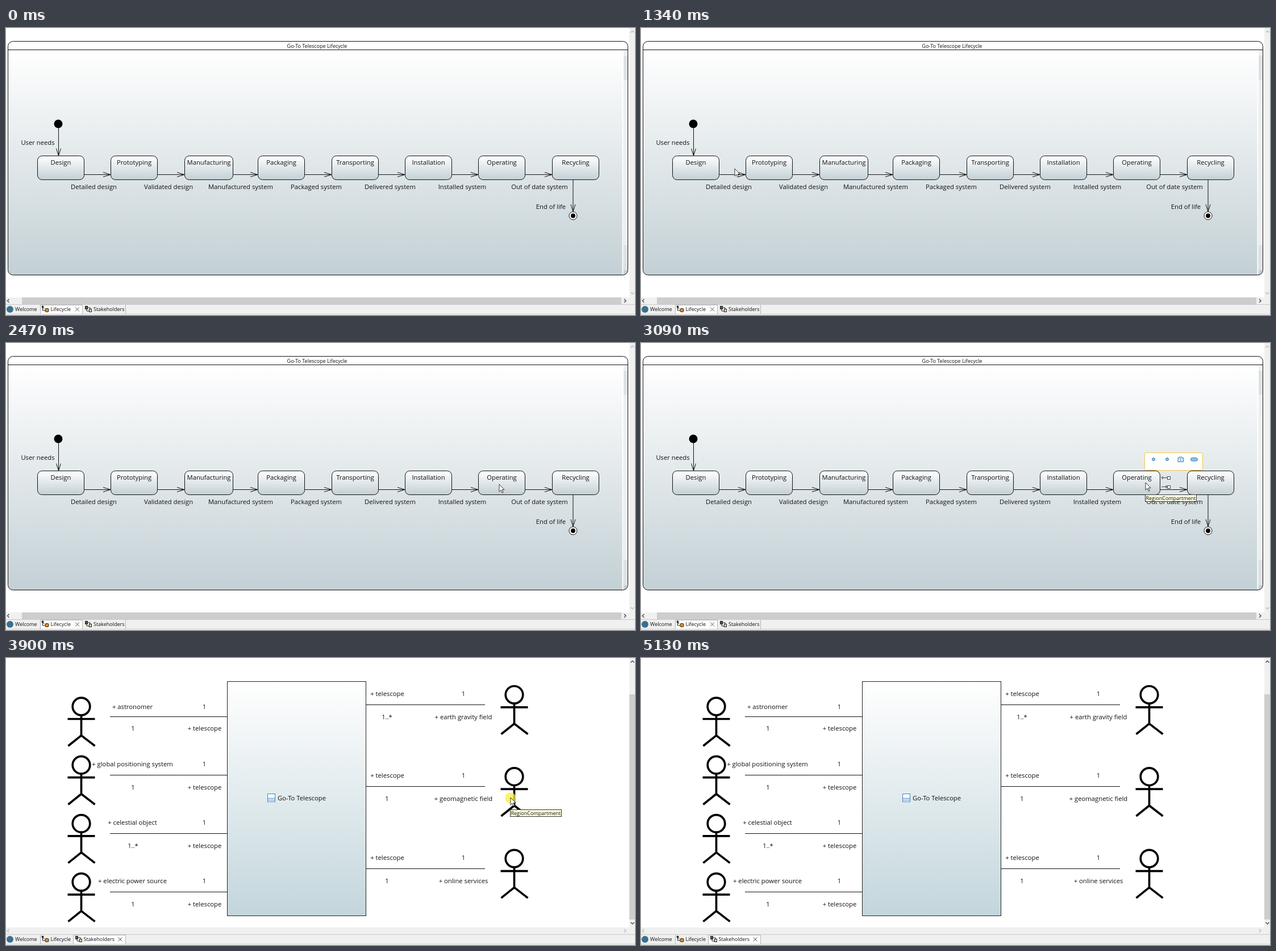
Animation, 1107 px wide and 506 px high, one loop 8 s. Source, as an HTML page:

```html
<!DOCTYPE html>
<html lang="en">
<head>
<meta charset="utf-8">
<title>Telescope model</title>
<style>
  html, body { margin: 0; width: 100%; height: 100%; overflow: hidden; background: #fff; }
  svg { display: block; width: 100%; height: 100%; }
  text { font: 11.25px "Open Sans", "Noto Sans", sans-serif; fill: #111; }
  .mid { text-anchor: middle; }
  .small { font-size: 9px; }
  .line { fill: none; stroke: #111; }
  .actor { fill: none; stroke: #000; stroke-width: 3.7; }
  .icon { stroke: #222; }
</style>
</head>
<body>
<svg id="stage" viewBox="0 0 1107 506">
  <defs>
    <linearGradient id="shade" x2="0" y2="1">
      <stop stop-color="#fff"/><stop offset="1" stop-color="#c3d0d5"/>
    </linearGradient>
    <linearGradient id="block" x2="0" y2="1">
      <stop stop-color="#fff"/><stop offset="1" stop-color="#c3d6dc"/>
    </linearGradient>
    <g id="chart-icon" class="icon">
      <path d="M2 1V8H6M2 4H5" fill="none"/>
      <circle cx="2" cy="1.5" r="1.5" fill="#222"/>
      <rect x="6.5" y="4.500" width="6" height="6" rx="1.500" fill="#e08a1e"/>
    </g>
    <g id="class-icon" class="icon">
      <path d="M5 3H9V6M3 6V9H7" fill="none"/>
      <rect x=".5" y=".5" width="4" height="5" fill="#555"/>
      <rect x="7.500" y="5.500" width="4" height="5" fill="#e8d9a0"/>
    </g>
    <path id="close" d="M-3.500-3.500 3.500 3.500M3.500-3.500-3.500 3.500" stroke="#555" fill="none"/>
  </defs>

  <g id="lifecycle" data-on="0 3900">
    <path d="M3.500 38.500H1094.500V426a10 10 0 0 1-10 9.500H13.500a10 10 0 0 1-10-9.500Z" fill="url(#shade)"/>
    <path d="M1085.500 40V434" stroke="#fff" stroke-width="2"/>
    <rect x="1087" y="40" width="7" height="387" fill="#eeefef"/>
    <path d="M1090.500 49V91M1090.500 383V427" stroke="#dfe1e2" stroke-width="7"/>
    <rect class="line" x="3.500" y="23.500" width="1091" height="412" rx="9"/>
    <path class="line" d="M3.500 38.500H1094.500"/>
    <text class="mid small" x="547.5" y="35">Go-To Telescope Lifecycle</text>
    <circle cx="92" cy="169" r="7.500"/>
    <path class="line" d="M92.500 176V225M88.500 212.500 92.500 225 96.500 212.500"/>
    <text class="mid" x="56" y="205.500">User needs</text>
    <path class="line" d="M998 268V323.500M994 311 998 323.500 1002 311"/>
    <circle cx="998" cy="331" r="7" fill="#fff" stroke="#111"/>
    <circle cx="998" cy="331" r="4"/>
    <text class="mid" x="959" y="319">End of life</text>
  </g>

  <g id="stakeholders" data-on="3900 8000">
    <rect x="389.500" y="41.500" width="244" height="413" fill="url(#block)" stroke="#222"/>
    <rect x="460.500" y="239.500" width="13" height="14" fill="#f4f9fd" stroke="#4a83bf"/>
    <path d="M461 247.500H473M461 250.500H473" stroke="#4a83bf"/>
    <text class="mid" x="520.5" y="251">Go-To Telescope</text>
  </g>

  <g id="chrome">
    <rect x="1097" width="10" height="475" fill="#f0f0f0"/>
    <rect y="475" width="1107" height="12" fill="#f0f0f0"/>
    <rect y="487" width="1107" height="18" fill="#f0f0f0"/>
    <path d="M0 487.500H1107M0 504.500H1107" stroke="#c9c9c9"/>
    <circle cx="7" cy="496" r="6" fill="#38718f"/>
    <text class="small" x="16" y="499">Welcome</text>
    <g data-on="0 3830">
      <rect id="thumb" x="28" y="475" width="1055" height="12" fill="#cdcdcd"/>
      <path d="M60.500 504V488.500H134.500V504" fill="#fff" stroke="#b4b4b4"/>
      <path d="M210.500 488V504" stroke="#b4b4b4"/>
      <use href="#close" x="125.500" y="496"/>
      <use href="#class-icon" x="139" y="490"/>
      <text class="small" x="154" y="499">Stakeholders</text>
    </g>
    <g data-on="3830 8000">
      <rect x="1097" y="64" width="10" height="397" fill="#cdcdcd"/>
      <path d="M60.500 488V504" stroke="#b4b4b4"/>
      <path d="M118.500 504V488.500H210.500V504" fill="#fff" stroke="#b4b4b4"/>
      <use href="#close" x="201" y="496"/>
      <use href="#class-icon" x="122" y="490"/>
      <text class="small" x="136.500" y="499">Stakeholders</text>
    </g>
    <use href="#chart-icon" x="62.500" y="490"/>
    <text class="small" x="78.500" y="499">Lifecycle</text>
    <g fill="none" stroke-width="1.500">
      <path id="sideways" d="M5.500 478 2.500 481 5.500 484M1088 478 1091 481 1088 484"/>
      <path id="upright" d="M1099.500 8 1102.500 5 1105.500 8M1099.500 466 1102.500 469 1105.500 466"/>
    </g>
  </g>

  <g data-on="3020 3690">
    <rect x="886.500" y="193.500" width="102" height="31" rx="3" fill="#fff" stroke="#f3c545"/>
    <g fill="#8fc1e8" stroke="#3c78ae">
      <circle cx="902" cy="205" r="2.500"/><circle cx="926" cy="205" r="2.500"/>
      <path d="M945 202.500H947V201H952V202.500H954.500V209.500H945Z" fill="#d6e8f6"/>
      <path d="M949.500 203V209" stroke-dasharray="2 1"/>
      <rect x="967.500" y="202.500" width="12" height="5.500" rx="2.500"/>
    </g>
    <g fill="#fff" stroke="#444">
      <path d="M926 237.500H916M919 235 916 237.500 919 240M916 253.500H926M923 251 926 253.500 923 256" fill="none"/>
      <rect x="926.500" y="235.500" width="5" height="5"/><rect x="926.500" y="251.500" width="5" height="5"/>
    </g>
  </g>
  <g id="selection" data-on="3760 3900">
    <rect x="832" y="225.500" width="82.500" height="42.500" fill="none" stroke="#000" stroke-width="1.800"/>
  </g>
  <circle data-on="3690 3970" cx="888" cy="247" r="9.800" fill="#fbee3c" opacity=".75"/>
  <g data-on="3090 4300">
    <rect x="887.500" y="267.500" width="90" height="12" fill="#ffffe1" stroke="#333"/>
    <text class="small" x="888.500" y="277">RegionCompartment</text>
  </g>
  <g id="cursor" data-on="400 5130">
    <path d="M0 0V13.200L3 10.400 5.100 15.200 7.100 14.300 5 9.600H9Z" fill="#fff" stroke="#222" stroke-width=".9"/>
    <g id="plus">
      <rect x="9.500" y="15.500" width="8" height="8" rx="1" fill="#fff" stroke="#111"/>
      <path d="M13.500 17.500V21.500M11.500 19.500H15.500" stroke="#111"/>
    </g>
  </g>
</svg>
<script>
const LOOP = 8000, STEP = 1000 / 15, PITCH = 129.4;
const $ = id => document.getElementById(id);
const label = (x, y, s) => `<text class="mid" x="${x}" y="${y}">${s}</text>`;
const line = (d, kind = 'line') => `<path class="${kind}" d="${d}"/>`;
const add = (id, markup) => $(id).insertAdjacentHTML('beforeend', markup);

// Lifecycle: state name, outgoing label and the label's centre
const states = [
  ['Design', 'Detailed design', 154.5], ['Prototyping', 'Validated design', 286],
  ['Manufacturing', 'Manufactured system', 413], ['Packaging', 'Packaged system', 546],
  ['Transporting', 'Delivered system', 676], ['Installation', 'Installed system', 803],
  ['Operating', 'Out of date system', 939], ['Recycling']
];
states.forEach(([name, next, centre], i) => {
  const x = Math.round(55 + PITCH * i) + 0.5;
  const w = name === 'Manufacturing' ? 85 : 82;
  const tip = Math.round(55 + PITCH * (i + 1));
  add('lifecycle',
    `<rect x="${x}" y="225.5" width="${w}" height="42" rx="8" fill="url(#shade)" stroke="#111"/>` +
    label(x + w / 2, 241, name));
  if (next) add('lifecycle',
    line(`M${x + w} 258.500H${tip}M${tip - 13} 254.500 ${tip} 258.500 ${tip - 13} 262.500`) +
    label(centre, 284, next));
});

// Stakeholders
const actor = (x, y) =>
  `<circle class="actor" cx="${x}" cy="${y}" r="15.3"/>` +
  line(`M${x} ${y + 15}V${y + 51}M${x - 24} ${y + 22}H${x + 24}` +
       `M${x - 23} ${y + 69.5}L${x} ${y + 51} ${x + 24} ${y + 69.5}`, 'actor');

[['astronomer', 1], ['global positioning system', 1], ['celestial object', '1..*'], ['electric power source', 1]]
  .forEach(([role, count], i) => {
    const y = 103.5 + 103 * i, first = i === 0;
    add('stakeholders', actor(132.5, 85.5 + 103.2 * i) + line(`M183 ${y}H389`) +
      label(222.5, y - (first ? 14 : 16), '+ ' + role) + label(349, y - (first ? 14 : 16), 1) +
      label(223.5, y + (first ? 24.5 : 25), count) + label(349.5, y + (first ? 24.5 : 25), '+ telescope'));
  });
[['earth gravity field', '1..*'], ['geomagnetic field', 1], ['online services', 1]]
  .forEach(([role, count], i) => {
    const y = 82.5 + Math.round(144.4 * i);
    add('stakeholders', actor(894.5, 64.8 + 144.4 * i) + line(`M634 ${y}H843`) +
      label(671, y - 15.5, '+ telescope') + label(805, y - 15.5, 1) +
      label(670.5, y + 25.5, count) + label(805, y + 25.5, '+ ' + role));
  });

// Selection handles around the state
for (let i = 0; i < 9; i++) {
  if (i === 4) continue;
  add('selection', `<rect x="${830 + i % 3 * 41}" y="${223.5 + (i / 3 | 0) * 21.2}" width="4" height="4"/>`);
}

// Pointer path: time, x, y
const path = [
  [400, 318, 499], [467, 290, 464], [600, 231, 382], [733, 180, 320], [867, 141, 281],
  [1000, 115, 257], [1133, 105, 247], [1200, 105, 247], [1333, 165, 248], [1467, 305, 251],
  [1600, 445, 254], [1733, 560, 256], [1933, 690, 258], [2067, 742, 258], [2200, 795, 258],
  [2333, 836, 254], [2467, 868, 249], [2600, 888, 246], [4267, 888, 246], [4400, 901, 267],
  [4533, 926, 309], [4667, 957, 360], [4800, 991, 417], [4933, 1021, 466], [5060, 1044, 504]
];
function pointerAt(t) {
  const i = path.findIndex(p => p[0] > t);
  if (i < 1) return path[i < 0 ? path.length - 1 : 0].slice(1);
  const [a, b] = [path[i - 1], path[i]];
  const k = (t - a[0]) / (b[0] - a[0]);
  return [1, 2].map(n => Math.round(a[n] + (b[n] - a[n]) * k));
}

const timed = [...document.querySelectorAll('[data-on]')]
  .map(node => [node, ...node.dataset.on.split(' ').map(Number)]);
const start = performance.now();

function draw() {
  const t = Math.max(0, performance.now() - start) % LOOP;
  for (const [node, from, to] of timed) node.style.display = t >= from && t < to ? '' : 'none';

  const [x, y] = pointerAt(400 + Math.floor((t - 400) / STEP + 0.01) * STEP);
  $('cursor').setAttribute('transform', `translate(${x} ${y})`);
  const onEdge = y >= 253 && y <= 262 && (x - 55) % PITCH > 83 && t < 3000;
  $('plus').style.display = onEdge ? '' : 'none';

  const overThumb = t >= 400 && t < 1140 && y >= 474 && y < 488;
  $('thumb').setAttribute('fill', overThumb ? '#a6a6a6' : '#cdcdcd');
  const [live, idle] = ['#505050', '#bfbfbf'];
  $('sideways').setAttribute('stroke', t < 3830 ? live : idle);
  $('upright').setAttribute('stroke', t < 3830 ? idle : live);
  requestAnimationFrame(draw);
}
draw();
</script>
</body>
</html>
```
